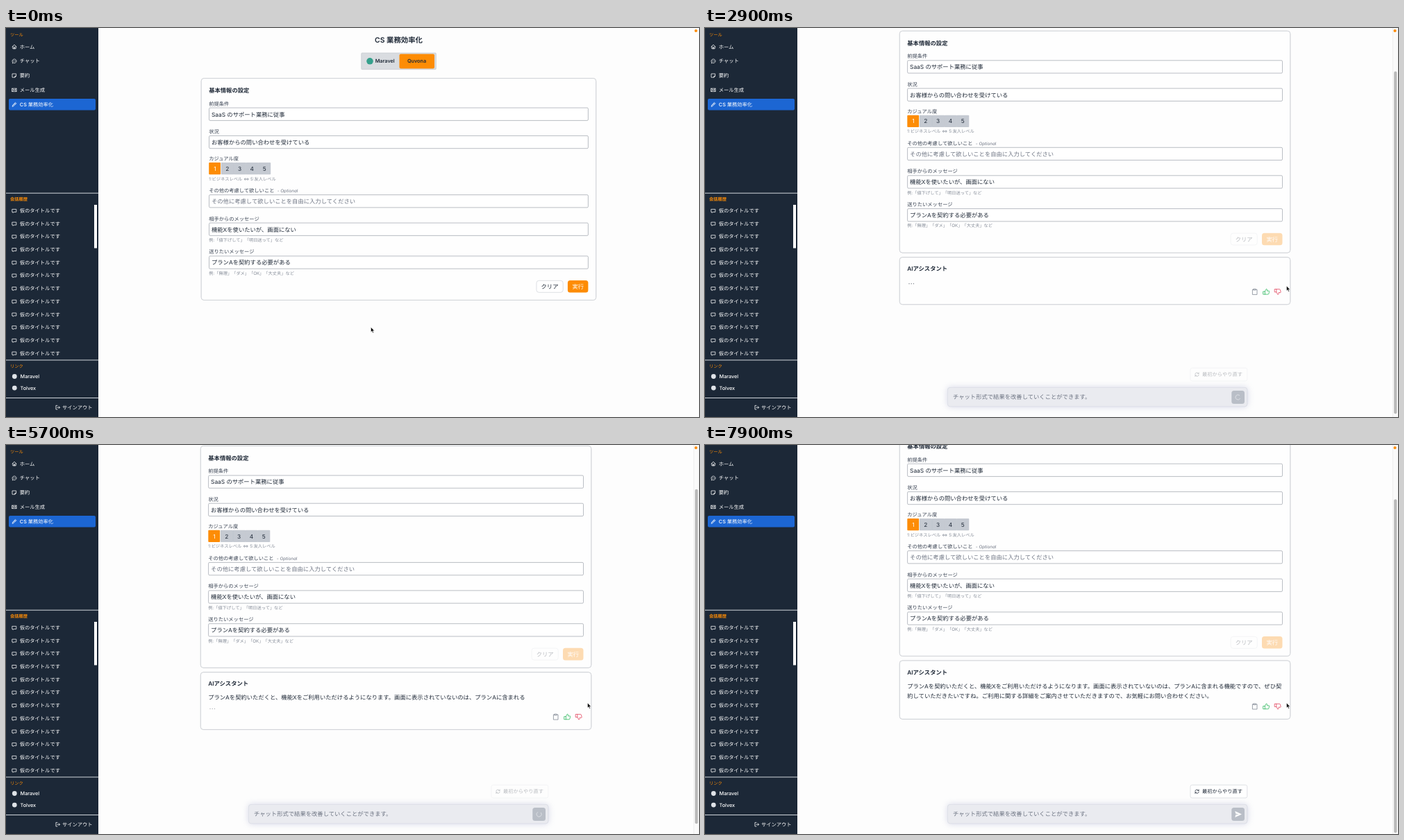
Animation of 998x561 px, one loop 8 s. Source, as an HTML page:

```html
<!DOCTYPE html>
<html lang="ja">
<head>
<meta charset="utf-8">
<title>CS 業務効率化</title>
<style>
html, body { margin: 0; width: 100%; height: 100%; overflow: hidden; background: #fdfdfd; }
svg { display: block; width: 100%; height: 100%; }
text {
  font-family: Inter, "Noto Sans CJK JP", "Noto Sans CJK", sans-serif;
  white-space: pre; text-rendering: geometricPrecision; text-spacing-trim: space-all;
}
.icon { fill: none; stroke-width: .75; stroke-linejoin: round; stroke-linecap: round; }
.card { fill: #fefefe; stroke: #c3c7ce; stroke-width: .7; filter: drop-shadow(0 .6px .7px #0003); }
.field { fill: #fff; stroke: #959ba5; stroke-width: .65; }
</style>
</head>
<body>
<svg id="stage" viewBox="0 0 998 561" preserveAspectRatio="none"></svg>
<script>
const DARK = '#1f2937', MID = '#374151', GRAY = '#6b7280', ORANGE = '#fd8c05', WHITE = '#fff';
const XS = 6.24, SM = 7.28, MD = 8.32, XL = 10.4, LINE = 14.56;
const LOOP = 8000, STEP = 100;

const text = (x, cy, size, str, fill = DARK, extra = '') =>
  `<text x="${x}" y="${cy + size * .37}" font-size="${size}" fill="${fill}" ${extra}>${str}</text>`;
const rect = (x, y, x2, y2, fill, r = 0, extra = '') =>
  `<rect x="${x}" y="${y}" width="${x2 - x}" height="${y2 - y}" rx="${r}" fill="${fill}" ${extra}/>`;
const BOLD = 'font-weight="600"', MEDIUM = 'font-weight="500"', CENTER = 'text-anchor="middle"';

// Paths are centred on 0,0.
const ICONS = {
  home: 'M-3 0L0-2.9L3 0M-2.2-.6V2.8H2.2V-.6M-.7 2.8V.7H.7V2.8',
  chat: 'M-2.6 2.8L-2.4 1.6A3 2.8 0 1 1-1.2 2.5ZM-1.3-.2H-1.2M0-.2H.1M1.3-.2H1.4',
  note: 'M-2.6-2.6H2.6V.8L.8 2.6H-2.6ZM2.6 .8H.8V2.6',
  mail: 'M-3-2.2H3V2.2H-3ZM-3-2L0 .5L3-2M-3 2L-1-.2M3 2L1-.2',
  pencil: 'M-2.8 2.8L-2.3 .9L1.5-2.8L2.8-1.5L-.9 2.3ZM.6-1.9L1.9-.6M-1.3 1.3L.8-.8',
  message: 'M-2.8-2.4H2.8V1.6H-.7L-1.9 2.8V1.6H-2.8Z',
  exit: 'M-.6-2.8H-2.6V2.8H-.6M-.8 0H3M1.5-1.5L3 0L1.5 1.5',
  clipboard: 'M-1.5-3.2H-3.3V4H3.3V-3.2H1.5M-1.5-4H1.5V-2.4H-1.5Z',
  thumb: 'M-4.2-.4H-1.9V3.7H-4.2ZM-1.9-.4L0-4C1.3-4 1.5-3 1.2-1.2H4C4.5-1.2 4.5-.6 4.3 0L3.5 3C3.3 3.7 3 3.7 2.5 3.7H-1.9',
  reload: 'M-2.7-.5A2.7 2.7 0 0 1 2.3-1.3M2.6-2.7V-1.1H1M2.7 .5A2.7 2.7 0 0 1-2.3 1.3M-2.6 2.7V1.1H-1'
};
const icon = (name, x, y, color = WHITE, extra = '') =>
  `<path class="icon" d="${ICONS[name]}" stroke="${color}" transform="translate(${x} ${y}) ${extra}"/>`;
const rule = y => rect(0, y, 133, y + .9, '#e5e9ee');

function sidebar() {
  const tools = [['home', 'ホーム'], ['chat', 'チャット'], ['note', '要約'], ['mail', 'メール生成'], ['pencil', 'CS 業務効率化']];
  let s = rect(0, 0, 133, 561, '#1c2837') + text(6, 10, XS, 'ツール', ORANGE, MEDIUM);
  s += rect(4, 102, 129, 118.5, '#1c66d3', 2);
  tools.forEach(([name, label], i) => {
    const y = 27 + i * 20.8;
    s += icon(name, 12, y) + text(19.8, y, SM, label, WHITE, MEDIUM);
  });
  s += rule(237.7) + text(6, 246.3, XS, '会話履歴', ORANGE, BOLD);
  for (let i = 0; i < 12; i++) {
    const y = 263.3 + i * 18.7;
    s += icon('message', 12, y + .5) + text(19.8, y, SM, '仮のタイトルです', WHITE, MEDIUM);
  }
  s += rect(127, 255, 131, 317.5, WHITE) + rule(478.5) + text(6, 487.5, XS, 'リンク', ORANGE, MEDIUM);
  ['Maravel', 'Tolvex'].forEach((label, i) => {
    const y = 502.5 + i * 16.6;
    s += `<circle cx="12.3" cy="${y}" r="3.4" fill="#dfe3e8"/>` + text(20.5, y, SM, label, WHITE, MEDIUM);
  });
  return s + rule(533) + icon('exit', 74.5, 547.2) + text(81, 547.3, SM, 'サインアウト', WHITE, MEDIUM);
}

function header(mid) {
  const x = mid - 565.5;
  return `<g transform="translate(${x})">` +
    text(565.5, 17.5, XL, 'CS 業務効率化', DARK, `${BOLD} ${CENTER}`) +
    rect(511.8, 36, 619.3, 59.7, '#d9dce0', 1, 'stroke="#c3c7cd" stroke-width=".7"') +
    rect(566.5, 37.5, 617, 58.5, ORANGE, 2) +
    '<circle cx="524" cy="47.8" r="4.8" fill="#35a08c"/>' +
    text(545.7, 47.8, SM, 'Maravel', DARK, `${BOLD} ${CENTER}`) +
    text(591.5, 47.8, SM, 'Quvona', DARK, `${BOLD} ${CENTER}`) + '</g>';
}

// The settings card between two edges; the buttons fade while a reply exists.
function form(left, right, faded) {
  const x = left + 11, end = right - 11;
  const row = (y, label, value, hint, color = DARK) =>
    text(x, y, SM, label, MID) +
    rect(x + .3, y + 6.1, end - .3, y + 24.4, WHITE, 1.5, 'class="field"') +
    text(x + 3.8, y + 15.6, MD, value, color) +
    (hint ? text(x, y + 30.7, XS, hint, '#858c98') : '');
  let s = rect(left, 72.6, right, 392.4, WHITE, 4, 'class="card"') +
    text(x, 90, MD, '基本情報の設定', DARK, BOLD) +
    row(109, '前提条件', 'SaaS のサポート業務に従事') +
    row(149.3, '状況', 'お客様からの問い合わせを受けている') +
    text(x, 188.5, SM, 'カジュアル度', MID);
  for (let i = 0; i < 5; i++) {
    const bx = x + i * 17.8;
    s += rect(bx, 194, bx + (i ? 17.8 : 16.8), 211.3, i ? '#c5cad2' : ORANGE, 1);
    if (i) s += rect(bx - .2, 194, bx + .2, 211.3, '#b3b9c3');
    s += text(bx + 8.7, 202.7, MD, i + 1, i ? DARK : WHITE, CENTER);
  }
  s += text(x, 217.3, XS, '1:ビジネスレベル ⇔ 5:友人レベル', '#858c98') +
    row(234.5, 'その他の考慮して欲しいこと', 'その他に考慮して欲しいことを自由に入力してください', '', GRAY) +
    text(x + 98.5, 235, XS, '- Optional', GRAY, 'font-style="italic"') +
    row(275, '相手からのメッセージ', '機能Xを使いたいが、画面にない', '例:「値下げして」「明日送って」など') +
    row(322.8, '送りたいメッセージ', 'プランAを契約する必要がある', '例:「無理」「ダメ」「OK」「大丈夫」など');
  return s + `<g opacity="${faded ? .3 : 1}">` +
    rect(end - 74.7, 364.3, end - 36.5, 381.3, WHITE, 3.5, 'stroke="#cfd3d9" stroke-width=".7"') +
    text(end - 55.7, 372.9, MD, 'クリア', DARK, CENTER) +
    `<g ${faded ? '' : 'id="run"'}>` + rect(end - 29.8, 364, end - .3, 381.6, ORANGE, 3.5) +
    text(end - 15, 372.9, MD, '実行', WHITE, CENTER) + '</g></g>';
}

function reply() {
  return rect(280.3, 399, 842.8, 467, WHITE, 4, 'class="card" id="box"') +
    text(291.2, 415.6, MD, 'AIアシスタント', DARK, BOLD) +
    '<g id="lines">' + [0, 1].map(i => text(291.2, 435.6 + i * LINE, MD, '', DARK)).join('') + '</g>' +
    '<g id="dots" fill="#1f2937">' + [294, 297.2, 300.4].map(x => `<circle cx="${x}" cy="437" r=".55"/>`).join('') + '</g>' +
    '<g id="tools">' + icon('clipboard', 791.7, 448.7, '#7a828e') +
    icon('thumb', 808.3, 448.7, '#22b455') + icon('thumb', 824.8, 448.7, '#e13a55', 'scale(1 -1)') + '</g>';
}

function chat() {
  return '<g id="reset">' + rect(699, 490.3, 780.8, 509, WHITE, 2.5, 'stroke="#d3d6dc" stroke-width=".7"') +
    icon('reload', 708.5, 499.7, DARK) + text(716, 499.7, SM, '最初からやり直す', DARK) + '</g>' +
    rect(349.3, 518.3, 781, 546, '#eaebf0', 4, 'stroke="#d2d5df" stroke-width=".6" style="filter:drop-shadow(0 0 5px #9aa0c866)"') +
    text(357, 532.4, MD, 'チャット形式で結果を改善していくことができます。', GRAY) +
    rect(758.3, 523, 777, 542, '#b9bec7', 3.5) +
    '<path id="spin" class="icon" d="M3.6 0A3.6 3.6 0 1 1 0-3.6" stroke="#e2e5ea"/>' +
    '<path id="send" fill="#fff" d="M763.3 528L773 532.5L763.3 537L764.3 533.2L769 532.5L764.3 531.8Z"/>';
}

const stage = document.getElementById('stage');
stage.innerHTML =
  `<g id="before">${header(565.5)}${form(281.2, 849.7, false)}</g>` +
  `<g id="after"><g id="page">${header(561.5)}${form(280.3, 842.8, true)}${reply()}</g>${chat()}` +
  rect(990.3, 0, 998, 561, '#fafafa') + rect(990, 0, 990.5, 561, '#e3e3e3') +
  rect(992.2, 0, 996.4, 10, '#b9b9b9', 2.1, 'id="thumb"') + '</g>' + sidebar() +
  `<circle cx="993.6" cy="4" r="2.1" fill="${ORANGE}"/>` +
  '<path id="arrow" d="M0 0V7L1.6 5.6L2.7 8.2L3.9 7.7L2.8 5.2H5Z" fill="#000" stroke="#fff" stroke-width=".5"/>' +
  '<path id="hand" d="M-.8 .7Q0-.5 .8 .7V3.6Q1.6 3 2.2 3.9Q3 3.3 3.5 4.2Q4.6 3.9 4.7 5V7L3.8 9.5H-.6L-3.1 6Q-2.9 4.9-1.8 5.4L-.8 6.4Z" fill="#fff" stroke="#000" stroke-width=".7"/>';

const el = {};
stage.querySelectorAll('[id]').forEach(n => el[n.id] = n);
const lines = el.lines.children;
const show = (n, on) => n.style.display = on ? '' : 'none';
const move = (n, x, y, more = '') => n.setAttribute('transform', `translate(${x} ${y}) ${more}`);
const clamp = v => Math.min(1, Math.max(0, v));
const ease = v => v * v * (3 - 2 * v);

const ANSWER = 'プランAを契約いただくと、機能Xをご利用いただけるようになります。画面に表示されていないのは、プランAに含まれる機能ですので、ぜひ契' +
  '約していただきたいですね。ご利用に関する詳細をご案内させていただきますので、お気軽にお問い合わせください。';
const WRAP = 66, CLICK = 2800, DONE = 7400;

function typed(t) {
  if (t <= 4400) return 0;
  if (t <= 5700) return Math.round(56 * (t - 4400) / 1300);
  return Math.min(ANSWER.length, 56 + Math.round(62 * (t - 5700) / 1500));
}

function scroll(t) {
  if (t < CLICK + 100) return 40;
  if (t < CLICK + 200) return 68.3;
  return 71.2 + 16.8 * ease(clamp((t - DONE) / 300));
}

function render(t) {
  const open = t >= CLICK, done = t >= DONE;
  show(el.before, !open);
  show(el.after, open);

  const k = ease(clamp((t - 1000) / 1500));
  const x = 525.5 + 312 * k, y = 431.5 - 59.5 * k;
  const hover = !open && x > 809 && y < 381.5;
  show(el.arrow, !hover);
  show(el.hand, hover);
  move(el.arrow, x, y);
  move(el.hand, x + .6, y);
  el.run.style.filter = hover ? 'brightness(.75)' : '';
  if (!open) return;

  const n = typed(t), rows = Math.ceil(n / WRAP);
  const grow = done ? 16.3 : rows * LINE;
  lines[0].textContent = ANSWER.slice(0, Math.min(n, WRAP));
  lines[1].textContent = ANSWER.slice(WRAP, Math.max(n, WRAP));
  el.box.setAttribute('height', 68 + grow);
  move(el.tools, 0, grow);
  move(el.dots, 0, rows * LINE);
  show(el.dots, !done);
  el.dots.style.opacity = .75 + .25 * Math.cos((t - CLICK) / 1000 * Math.PI);

  const top = scroll(t), ratio = 561 / (632.2 + grow);
  move(el.page, 0, -top);
  el.thumb.setAttribute('y', top * ratio + 2);
  el.thumb.setAttribute('height', 561 * ratio - 4);

  el.reset.style.opacity = done ? 1 : .3;
  show(el.spin, !done);
  show(el.send, done);
  move(el.spin, 767.6, 532.5, `rotate(${(t - CLICK) * .36})`);
}

function tick() {
  render(Math.floor(performance.now() % LOOP / STEP) * STEP);
  requestAnimationFrame(tick);
}
tick();
</script>
</body>
</html>
```
